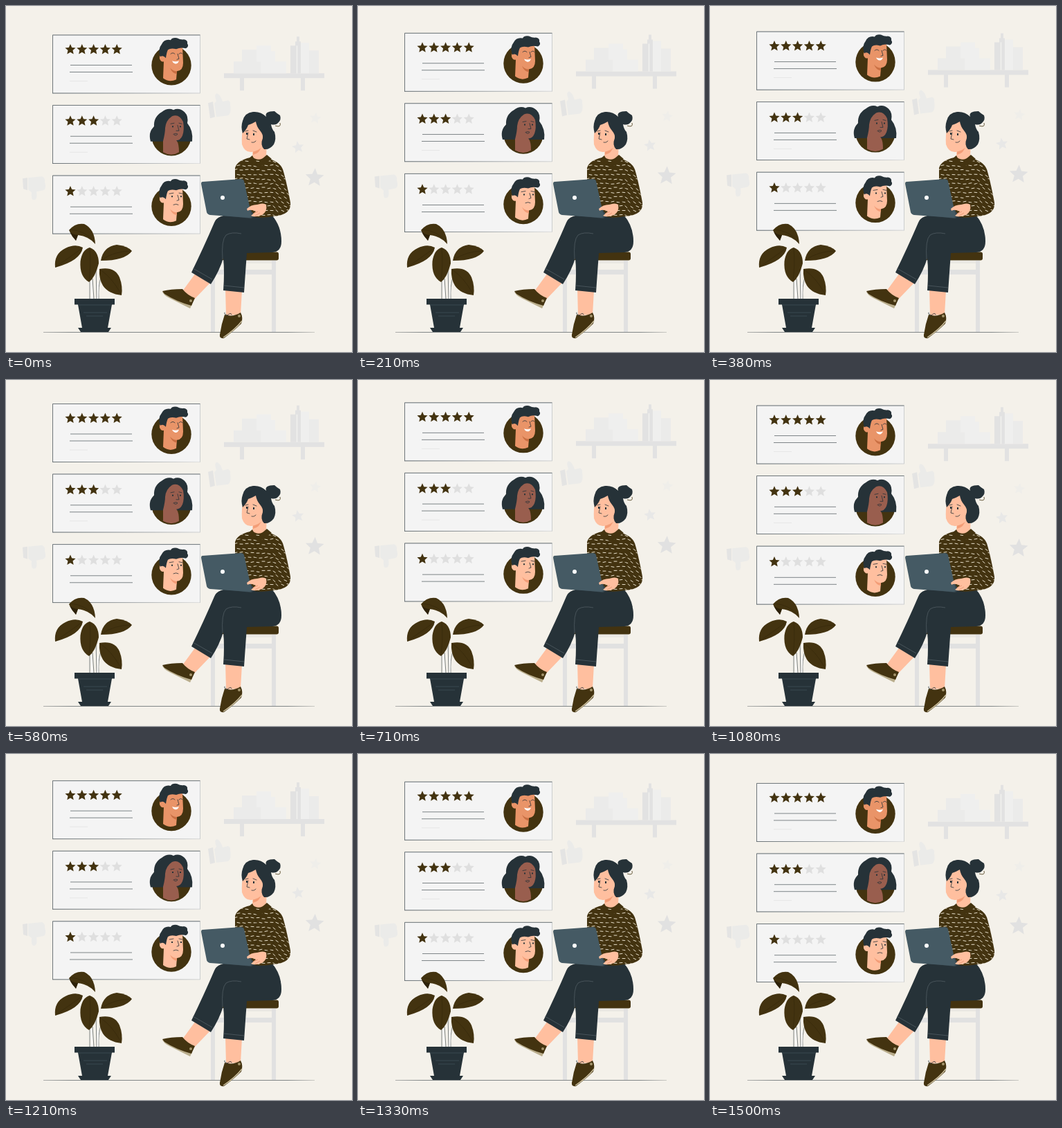
Recreate the animation shown at these times as an HTML page. Size 500 by 500 pixels, loop 1.54 s.

```html
<!DOCTYPE html>
<html lang="en">
<head>
<meta charset="utf-8">
<title>Customer reviews</title>
<style>
html, body { margin: 0; width: 100%; height: 100%; overflow: hidden; background: #f4f1ea; }
svg { display: block; width: 100%; height: 100%; }
.dark { fill: #263238; }
.brown { fill: #433310; }
.skin { fill: #ffbf9f; }
.line { fill: none; stroke: #263238; stroke-width: .8; stroke-linecap: round; }
.vein { fill: none; stroke: #2b2008; stroke-width: .6; opacity: .6; }
</style>
</head>
<body>
<svg viewBox="0 0 500 500">
  <defs>
    <linearGradient id="fade">
      <stop offset="0" stop-color="#60696d"/><stop offset=".4" stop-color="#8d9396"/><stop offset="1" stop-color="#e2e2e1"/>
    </linearGradient>
    <linearGradient id="floor" gradientUnits="userSpaceOnUse" x1="54" x2="446" y1="0" y2="0">
      <stop offset="0" stop-color="#a5a6a4"/><stop offset=".1" stop-color="#747a7c"/><stop offset=".9" stop-color="#747a7c"/><stop offset="1" stop-color="#c5c4bf"/>
    </linearGradient>
    <path id="shirt" d="M353 219Q334 223 331 234L331 258L344 262L352 303Q365 308 386 304Q413 302 411 284Q405 252 400 236Q395 224 377 220Q364 214 353 219Z"/>
    <clipPath id="shirtClip"><use href="#shirt"/></clipPath>
    <path id="manHair" class="dark" d="M223 73Q219 62 225 55Q229 47 238 49Q240 45 247 46Q253 49 257 48Q263 49 262 54Q265 58 260 61Q252 59 246 62Q238 60 234 63Q232 67 231 75Q227 70 223 73Z"/>
    <path id="manFace" d="M230 62L228 71Q221 69 222 76Q224 81 228 80L227 104Q236 111 246 106L247 94Q256 93 256 82L255 59Q242 53 230 62Z"/>
  </defs>

  <path d="M54 471.500H446" stroke="url(#floor)" stroke-width=".9"/>

  <g id="floating">
    <g fill="#e2e2e2">
      <path d="M315 97H460V104H315ZM338 104H344V122H338ZM426 104H432V122H426Z"/>
      <path fill="#ebebea" d="M329 80H368V97H329ZM341 63H362V80H341ZM438 64H452V97H438Z"/>
      <path fill="#efefee" d="M362 57H383V80H362ZM368 80H405V97H368ZM383 65H389V80H383ZM425 53H438V97H425Z"/>
      <path d="M411 57H418V97H411ZM418 51H426V97H418ZM420 44H424V51H420Z"/>
      <path d="M420.500 57V97" stroke="#f1f1ef" stroke-width="1.500"/>
      <path fill="#ebebe9" d="M301 141L304 137Q300 127 305 126Q310 128 313 138L321 136Q325 138 324 142Q326 155 321 158L304 160Z"/>
      <path fill="#e4e4e3" d="M292 140L299 138L302 160L295 162Z"/>
      <path fill="#ebebe9" d="M32 248L52 246Q57 248 56 254Q59 264 54 266L44 268Q46 280 40 280Q36 280 37 269L32 265Z"/>
      <path fill="#e4e4e3" d="M24 249L31 248L31 266L25 264Z"/>
    </g>
    <g id="backStars"></g>
    <g id="cards"></g>

    <circle class="brown" cx="239" cy="85.500" r="28.700"/>
    <use href="#manFace" fill="#e99468"/>
    <path fill="#c96f43" d="M247 94Q241 94 237 89Q240 97 247 98Z"/>
    <use href="#manHair"/>
    <path class="line" d="M238 69Q241 66 244 69M250 69Q253 66 255 69M248 69L250 76L247 77"/>
    <path fill="#fff" d="M240 79Q245 81 250 79Q248 84 244 83Q241 82 240 79Z"/>

    <circle class="brown" cx="239" cy="187.500" r="28.700"/>
    <path class="dark" d="M225 153Q234 146 242 150Q250 146 258 153Q264 159 262 169Q271 180 269 195.500L209 195.500Q205 182 214 174Q213 160 225 153Z"/>
    <path fill="#995e4e" d="M240 159Q250 155 256 167Q258 179 255 187Q252 194 246 194L247 195Q250 199 250 211Q239 218 227 211L227 195Q230 183 230 176Q231 165 240 159Z"/>
    <path class="line" d="M238 170L243 169M250 169L254 170M248 172L250 180L246 180M242 185Q246 183 248 185Q246 188 243 186"/>
    <path class="dark" d="M240 173h2v2h-2zM251 173h2v2h-2z"/>

    <circle class="brown" cx="239" cy="289" r="28.700"/>
    <g transform="translate(0 204)">
      <use href="#manFace" class="skin"/>
      <path fill="#f39d77" d="M247 94Q241 94 237 89Q240 97 247 98Z"/>
      <use href="#manHair"/>
      <path class="line" d="M236 67L242 66M250 66L255 67M248 69L250 76L247 77M242 83Q246 81 249 83"/>
      <path class="dark" d="M239 70h2v2h-2zM252 70h2v2h-2z"/>
    </g>
  </g>

  <g id="plant">
    <path d="M121 394V423M125 394L127 423M130 376L131 423M137 392Q133 405 134 423" fill="none" stroke="#4b5356" stroke-width=".7"/>
    <path d="M123 396L124.500 423M133 400L132.500 423" fill="none" stroke="#fff" stroke-width="1.500"/>
    <g class="brown">
      <path d="M91 324Q100 313 113 315Q128 322 129 344Q120 333 104 331L101 339Q95 332 91 324Z"/>
      <path d="M71 378Q69 358 86 350Q100 343 111 349Q108 368 71 378Z"/>
      <path d="M121 349Q134 354 134 372Q129 392 120 399Q106 391 107.500 369Q110 352 121 349Z"/>
      <path d="M137 368Q140 348 160 345Q176 347 182 354Q172 368 137 368Z"/>
      <path d="M135 380Q157 376 164 392Q169 405 167 418Q148 416 140 404Q134 394 135 380Z"/>
    </g>
    <path fill="#2d2109" d="M92 326Q97 331 104 331L101 339Q95 333 92 326Z"/>
    <path class="vein" d="M92 323Q114 324 128 341M72 377Q92 363 110 350M121 350Q123 375 120 397M138 367Q157 354 181 354M136 381Q153 392 166 416"/>
    <path class="dark" d="M99 423H157V431.500H153L147 465H152L148 471H108L104 465H110L104 431.500H99Z"/>
    <path d="M104 432H152M112 443H146M116 448H140" stroke="#455a64" stroke-width=".6"/>
  </g>

  <g id="chair">
    <path fill="#e1e1e1" d="M296 368H302V381H384V368H390V471H384V388H302V471H296Z"/>
    <path fill="#ebe9e4" d="M302 368H384V372H302Z"/>
    <rect class="brown" x="312" y="355.500" width="82" height="12" rx="3"/>
  </g>

  <g id="woman">
    <path class="skin" d="M274 386L296 399L271 425L255 412ZM317 408L341 411L339 446L318 447Z"/>
    <path fill="#b9ad8c" d="M226 413Q228 418 236 422L266 437L269 431L236 414Z"/>
    <path class="brown" d="M226 412Q238 409 255 409Q262 418 273 422L268 433Q246 427 229 416Z"/>
    <circle cx="267" cy="426" r="2" fill="#a3946c"/>
    <path class="brown" d="M316 446Q328 450 339 443Q343 450 340 459Q330 469 315 480Q308 481 309 475Q311 460 316 446Z"/>
    <path d="M341 455Q332 467 314 479" fill="none" stroke="#c9bd9c" stroke-width="1.500"/>
    <circle cx="337" cy="448" r="2" fill="#a3946c"/>
    <path class="line" d="M320 447Q314 445 316 443M320 447Q325 442 326 446"/>

    <path class="dark" d="M384 302Q398 318 398 340Q398 355 385 356L348 357Q346 385 344 414L314 411Q316 385 314 364Q309 382 296 402L268 385Q286 348 301 313Q307 297 350 303Z"/>
    <path d="M313 366Q311 338 318 331Q326 326 340 329M270 379L298 395M315 404L344 407" fill="none" stroke="#5e6b71" stroke-width=".6"/>

    <use href="#shirt" class="brown"/>
    <path id="dashes" clip-path="url(#shirtClip)" fill="none" stroke="#e9e1cd" stroke-linecap="round"/>
    <path class="vein" d="M362 226Q360 252 362 285M384 250Q389 270 384 282Q374 286 366 288"/>
    <path class="skin" d="M357 201L356 218Q365 226 376 217L377 196Z"/>
    <path fill="#f39d77" d="M357 210Q365 208 370 201Q367 213 357 215Z"/>
    <path class="brown" d="M356 216L362 228L377 215L384 221L368 232L361 229L354 229L350 221Z"/>
    <path class="skin" d="M343 172Q340 188 341 200Q345 212 355 211Q366 209 373 201L373 170Q355 160 343 172Z"/>
    <path class="dark" d="M342 184Q339 174 342 166Q345 154 357 153Q368 152 376 160Q373 152 388 152Q391 155 396 158Q398 164 394 168Q390 173 383 171Q384 178 388 182Q391 192 387 200Q381 208 373 207Q367 201 371 191Q372 186 367 180Q362 174 361 167Q356 170 350 172Q348 178 342 184Z"/>
    <path class="line" d="M346 181L350 180M357 180L362 182M350 183L348 192L352 193M355 197Q359 198 361 195"/>
    <path class="dark" d="M347 183h2v3h-2zM357 184h2v3h-2z"/>
    <path d="M389 173Q398 176 396 169" fill="none" stroke="#433310" stroke-width=".8"/>

    <path fill="#37474f" d="M316 303L352 292L360 304L354 307Z"/>
    <path fill="#455a64" d="M284 254L340 250Q343 250 344 253L355 303Q355 306 351 306L295 302Q291 301 290 298L282 257Q282 254 284 254Z"/>
    <circle cx="313" cy="277" r="3" fill="#fff"/>
    <path class="skin" d="M348 293Q354 287 363 287Q372 284 376 287Q378 297 370 302Q359 306 354 303L361 297Q354 293 349 296Z"/>
    <path d="M357 300L364 297M360 303L367 299" fill="none" stroke="#e58d69" stroke-width=".7"/>
  </g>
</svg>
<script>
const $ = id => document.getElementById(id);
const BROWN = '#433310', PALE = '#dfdfdf';

function star(x, y, r, fill, turn = 0) {
  const points = Array.from({ length: 10 }, (_, i) => {
    const a = turn + i * Math.PI / 5, d = i % 2 ? r * .46 : r;
    return (x + d * Math.sin(a)).toFixed(1) + ',' + (y - d * Math.cos(a)).toFixed(1);
  });
  return `<polygon points="${points.join(' ')}" fill="${fill}"/>`;
}

const rule = (x1, x2, y, color) => `<path d="M${x1} ${y}H${x2}" stroke="${color}"/>`;

function card(top, score, starY, lineY) {
  let out = `<rect x="67.5" y="${top}" width="213" height="84" fill="#f4f4f4" stroke="#c3c6c7" stroke-width=".8"/>
    <path d="M67.500 ${top + 84}V${top}H280.500" fill="none" stroke="#656e72" stroke-width=".9"/>
    <rect x="67" y="${top + 83.6}" width="213" height=".9" fill="url(#fade)"/>`;
  for (let i = 0; i < 5; i++) out += star(93 + i * 16.8, starY, 8, i < score ? BROWN : PALE);
  return out + rule(93, 182, lineY, '#7d8487') + rule(92, 183, lineY + 10, '#7d8487')
    + (score > 1 ? rule(92, 118, lineY + 23, '#e6e6e6') : '');
}

$('cards').innerHTML = card(41.7, 5, 62.7, 85.2) + card(143.2, 3, 166, 188) + card(244.8, 1, 267.7, 290);
$('backStars').innerHTML = star(446, 248, 14, '#e1e1e1', .05) + star(422, 204, 9, '#e8e8e7', -.15) + star(447, 162, 8.5, '#efeeea', .15);

// Shirt pattern: small, slightly turned dashes in staggered rows
let seed = 7, dashes = '';
const random = () => (seed = seed * 16807 % 2147483647) / 2147483647;
for (let row = 0; row < 13; row++) {
  for (let x = 330 + row % 2 * 4; x < 412; x += 8) {
    const a = (x > 384 ? .5 : 0) + (random() - .5) * .5, y = 223 + row * 6.5 + random() * 2;
    dashes += `M${x} ${y}l${4 * Math.cos(a)} ${4 * Math.sin(a)}`;
  }
}
$('dashes').setAttribute('d', dashes);

const PERIOD = 1540, TOP_TIME = 733, RISE = 9.9;
function draw(now) {
  const away = Math.abs(now % PERIOD - TOP_TIME);
  const share = Math.min(away, PERIOD - away) / (PERIOD / 2);
  $('floating').setAttribute('transform', `translate(0 ${(share - 1) * RISE + .75})`);
  requestAnimationFrame(draw);
}
draw(0);
</script>
</body>
</html>
```
